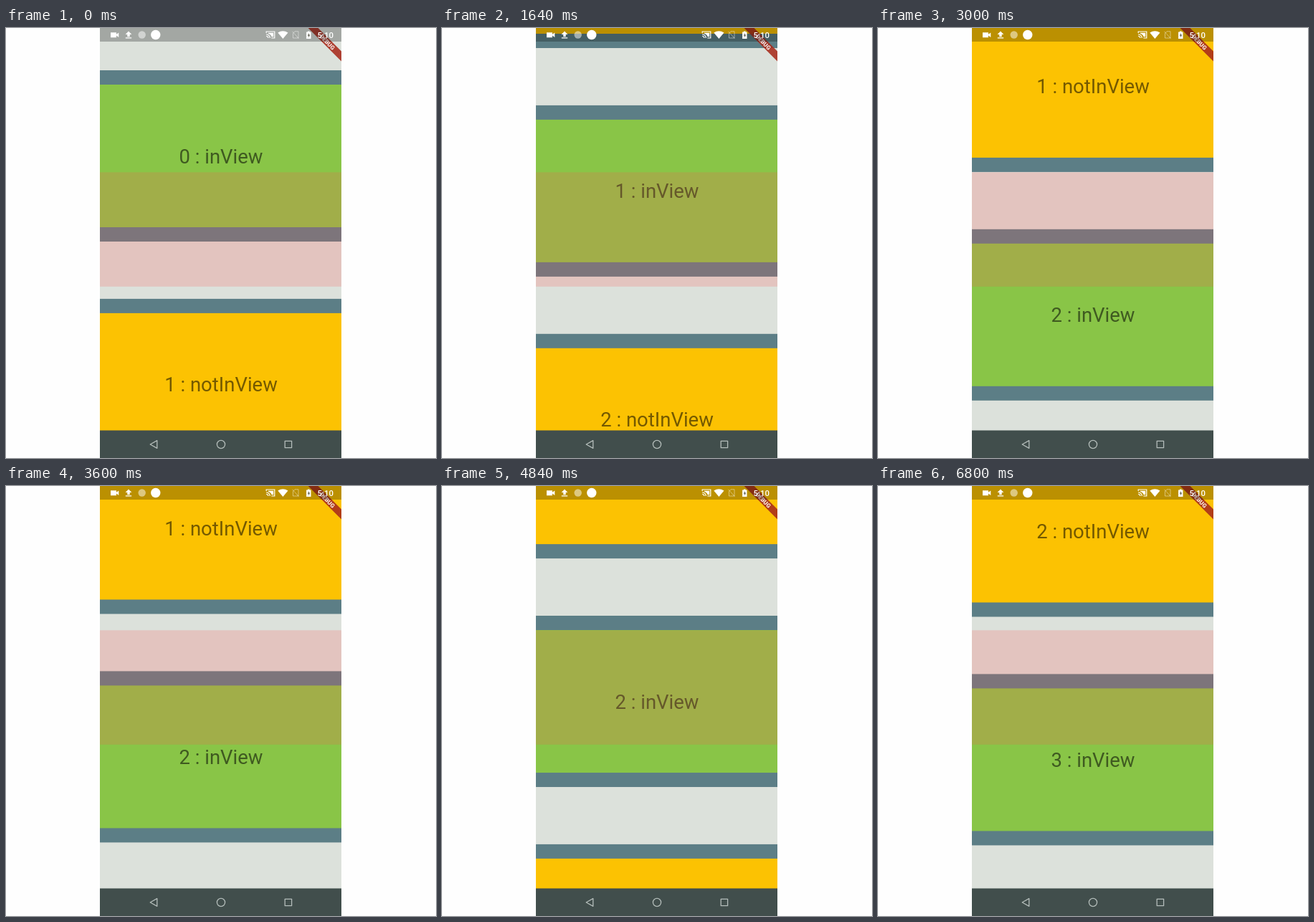
These frames come from a looping animation (600 by 600 pixels, 7360 ms). An HTML page:

```html
<!DOCTYPE html>
<html lang="en">
<head>
<meta charset="utf-8">
<title>In-view list</title>
<style>
  html, body { margin: 0; width: 100%; height: 100%; overflow: hidden; background: #fefefe; }
  svg { display: block; width: 100vw; height: 100vh; }
  text { font-family: Roboto, sans-serif; text-anchor: middle; }
</style>
</head>
<body>
<svg viewBox="0 0 600 600">
  <defs>
    <clipPath id="screen"><rect x="131" width="337" height="600"/></clipPath>
  </defs>
  <rect width="600" height="600" fill="#fefefe"/>
  <g clip-path="url(#screen)">
    <rect x="131" width="337" height="600" fill="#dce1db"/>
    <g id="list"></g>
    <rect x="131" y="201.3" width="337" height="159.5" fill="#ff5252" fill-opacity=".2"/>

    <g transform="translate(468 0) rotate(45)">
      <rect x="-34" y="23" width="68" height="9.8" fill="#a82c1c" fill-opacity=".88"/>
      <text y="30.9" font-size="8.2" font-weight="900" fill="#fff" fill-opacity=".9">DEBUG</text>
    </g>
    <rect x="131" width="337" height="19" fill="#000" fill-opacity=".26"/>

    <g id="status" fill="#fff">
      <path d="M146 6.2h8v2.6l3.3-2.4v6.6l-3.3-2.4v2.6h-8z"/>
      <path d="M171 4.5l4.4 4.5h-2.7v3.3h-3.4V9h-2.7zM166.8 13.2h8.4v1.3h-8.4z"/>
      <circle cx="189.7" cy="9.5" r="5.2" fill-opacity=".5"/>
      <circle cx="208.8" cy="9.5" r="6.7"/>
      <path d="M363.2 7V5h11.6v9h-4.5M363.2 8.9a5.1 5.1 0 0 1 5.1 5.1M363.2 11.3a2.7 2.7 0 0 1 2.7 2.7" fill="none" stroke="#fff" stroke-width="1.2"/>
      <path d="M366 6.7h7.2v5.6h-2.6a5.6 5.6 0 0 0-4.6-4.4z"/>
      <path d="M386.4 15l-7.1-8.4q7.1-4.5 14.2 0z"/>
      <g fill="none" stroke="#fff" stroke-opacity=".45">
        <path d="M400.5 14V7.5l2.5-2.7h5V14z"/>
        <path d="M399.5 4.8l9 9.8"/>
      </g>
      <path d="M421 4.4h2.6v1.1h1.9v9.6h-6.4V5.5h1.9z"/>
      <path d="M422.8 7l-2 3.8h1.4v2.6l2-3.9h-1.4z" fill="#5d5d50"/>
      <text x="445.7" y="14.2" font-size="11.4" font-weight="500">5:10</text>
    </g>

    <rect x="131" y="561.5" width="337" height="39" fill="#414e4c"/>
    <g fill="none" stroke="#b4bdba" stroke-width="1.3" stroke-linejoin="round">
      <path d="M201.2 581l9.6-5.4v10.8z"/>
      <circle cx="300" cy="581" r="5.6"/>
      <rect x="389.2" y="576.3" width="9.4" height="9.4"/>
    </g>
  </g>
</svg>
<script>
const LOOP = 7360, STEP = 40, PITCH = 318.9, TOP = 59, CARD = 239, MIDDLE = 281.5;

// Scroll position in px at a few times in ms, joined by a monotone cubic.
const times = [0, 840, 1640, 3000, 4120, 5640, 6800];
const scrolls = [0, 125.3, 270, 416, 458, 603, 753.3];
const rates = times.slice(1).map((t, i) => (scrolls[i + 1] - scrolls[i]) / (t - times[i]));
const slopes = times.map((_, i) => {
  if (i === 0) return 0.03;
  if (i === rates.length) return 0.08;
  return 2 * rates[i - 1] * rates[i] / (rates[i - 1] + rates[i]);
});

function scrollAt(t) {
  const last = times.length - 1;
  if (t >= times[last]) return scrolls[last];
  let i = 0;
  while (t >= times[i + 1]) i++;
  const h = times[i + 1] - times[i], u = (t - times[i]) / h, v = 1 - u;
  return scrolls[i] * (1 + 2 * u) * v * v + scrolls[i + 1] * (3 - 2 * u) * u * u
    + h * u * v * (slopes[i] * v - slopes[i + 1] * u);
}

function add(parent, tag, attrs) {
  const el = document.createElementNS("http://www.w3.org/2000/svg", tag);
  for (const k in attrs) el.setAttribute(k, attrs[k]);
  return parent.appendChild(el);
}

const list = document.getElementById("list");
const cards = Array.from({ length: 5 }, () => {
  const g = add(list, "g", {});
  add(g, "rect", { x: 131, width: 337, height: CARD, fill: "#5c7e86" });
  const body = add(g, "rect", { x: 131, y: 20, width: 337, height: CARD - 40 });
  const label = add(g, "text", { x: 300, y: 129.5, "font-size": 27.5, fill: "#000", "fill-opacity": .54 });
  return { g, body, label };
});

function draw(t) {
  const scroll = scrollAt(t);
  cards.forEach(({ g, body, label }, i) => {
    const y = TOP + PITCH * i - scroll;
    const inView = y <= MIDDLE && y + CARD >= MIDDLE;
    g.setAttribute("transform", `translate(0 ${y.toFixed(2)})`);
    body.setAttribute("fill", inView ? "#89c547" : "#fcc202");
    label.textContent = `${i} : ${inView ? "inView" : "notInView"}`;
  });
}

const start = performance.now();
function frame() {
  const t = (performance.now() - start) % LOOP;
  draw(Math.floor(t / STEP + 0.01) * STEP);
  requestAnimationFrame(frame);
}
frame();
</script>
</body>
</html>
```
